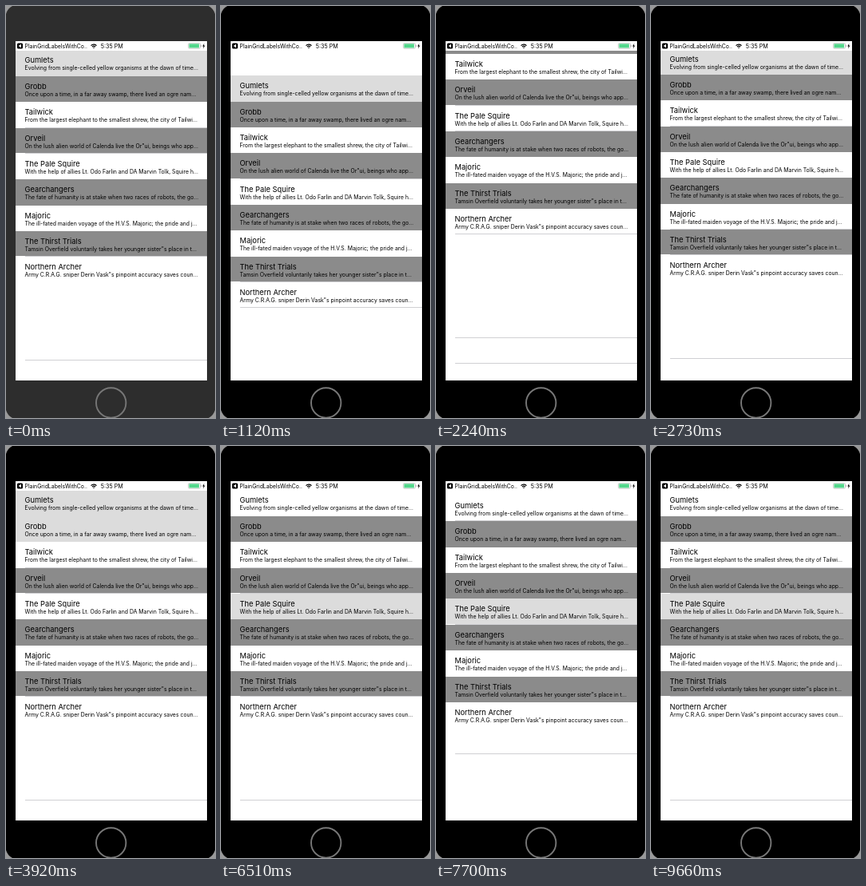
Animation of 262x516 px, one loop 9800 ms. Source, as an HTML page with a canvas:

```html
<!DOCTYPE html>
<html lang="en">
<head>
<meta charset="utf-8">
<title>Selectable list</title>
<style>
html, body { margin: 0; width: 100%; height: 100%; overflow: hidden; background: #000; }
canvas { display: block; width: 262px; height: 516px; }
</style>
</head>
<body>
<canvas id="stage" width="262" height="516"></canvas>
<script>
const ctx = document.getElementById('stage').getContext('2d');
const LOOP = 9800, STEP = 70;
const LEFT = 12, RIGHT = 252, TOP = 56, BOTTOM = 469, INDENT = 24;
const ROW_BASE = 55.49, ROW_HEIGHT = 32.34;
const FAMILY = 'Inter, "Liberation Sans", sans-serif';
const TITLE_FONT = `9.3px ${FAMILY}`, SMALL_FONT = `6.9px ${FAMILY}`;

const rows = [
  ['Gumlets', 'Evolving from single-celled yellow organisms at the dawn of time, they'],
  ['Grobb', 'Once upon a time, in a far away swamp, there lived an ogre named Grobb'],
  ['Tailwick', 'From the largest elephant to the smallest shrew, the city of Tailwick is'],
  ['Orveil', 'On the lush alien world of Calenda live the Or"ui, beings who appear'],
  ['The Pale Squire', 'With the help of allies Lt. Odo Farlin and DA Marvin Tolk, Squire has'],
  ['Gearchangers', 'The fate of humanity is at stake when two races of robots, the good'],
  ['Majoric', 'The ill-fated maiden voyage of the H.V.S. Majoric; the pride and joy of'],
  ['The Thirst Trials', 'Tamsin Overfield voluntarily takes her younger sister"s place in the'],
  ['Northern Archer', 'Army C.R.A.G. sniper Derin Vask"s pinpoint accuracy saves countless']
];

// Each pull drags the list to a peak, then it springs back.
const pulls = [
  { start: 910, peak: 1330, end: 1960, amount: 63.77 },
  { start: 1960, peak: 2240, end: 2940, amount: -60.22 },
  { start: 7000, peak: 7420, end: 8120, amount: 48.99 }
];

function scrollAt(t) {
  const p = pulls.find(p => t > p.start && t < p.end);
  if (!p) return 0;
  if (t >= p.peak) return p.amount * Math.exp((p.peak - t) / 140);
  const u = (t - p.start) / (p.peak - p.start);
  return p.amount * u * u * (3 - 2 * u);
}

function isSelected(i, t) {
  if (i === 0) return t < 3990;
  if (i === 1) return t >= 3920 && t < 5880;
  return i === 4 && t >= 5880;
}

function rect(x, y, w, h, color) {
  ctx.fillStyle = color;
  ctx.fillRect(x, y, w, h);
}

function text(str, x, y, font) {
  ctx.font = font;
  ctx.fillStyle = '#000';
  ctx.fillText(str, x, y);
}

function truncate(str, width, font) {
  ctx.font = font;
  while (ctx.measureText(str + '...').width > width) str = str.slice(0, -1);
  return str.trimEnd() + '...';
}

function polygon(points, color) {
  ctx.fillStyle = color;
  ctx.beginPath();
  points.forEach(([x, y]) => ctx.lineTo(x, y));
  ctx.fill();
}

function drawCorner(sx, sy) {
  ctx.save();
  ctx.translate(sx > 0 ? 0 : 262, sy > 0 ? 0 : 516);
  ctx.scale(sx, sy);
  ctx.fillStyle = '#999';
  ctx.beginPath();
  ctx.moveTo(0, 10);
  ctx.quadraticCurveTo(2, 3, 8, 0);
  ctx.lineTo(0, 0);
  ctx.fill();
  ctx.restore();
}

function drawPhone(t) {
  rect(0, 0, 262, 516, t < 980 ? '#2d2d2d' : '#000');
  for (const sx of [1, -1]) {
    for (const sy of [1, -1]) drawCorner(sx, sy);
  }
  ctx.strokeStyle = '#777';
  ctx.lineWidth = 1.9;
  ctx.beginPath();
  ctx.arc(131.7, 497, 18.7, 0, Math.PI * 2);
  ctx.stroke();
}

function drawStatus() {
  rect(LEFT, 44, RIGHT - LEFT, TOP - 44, '#fff');
  ctx.fillStyle = '#000';
  ctx.beginPath();
  ctx.roundRect(14, 46.5, 7, 7, 1.5);
  ctx.fill();
  polygon([[15.5, 50], [19, 47.8], [19, 52.2]], '#fff');
  text('PlainGridLabelsWithCo..', 23.5, 52.5, SMALL_FONT);
  text('5:35 PM', 118.7, 52.5, `7.2px ${FAMILY}`);

  ctx.strokeStyle = '#000';
  ctx.lineWidth = 1.2;
  for (const r of [2.8, 4.8]) {
    ctx.beginPath();
    ctx.arc(110, 53, r, -Math.PI * 0.76, -Math.PI * 0.24);
    ctx.stroke();
  }
  polygon([[110, 53.2], [108.9, 51.8], [111.1, 51.8]], '#000');

  ctx.strokeStyle = '#aaa';
  ctx.lineWidth = 0.6;
  ctx.beginPath();
  ctx.roundRect(228.6, 46.6, 15, 6.6, 1.5);
  ctx.stroke();
  rect(229.5, 47.4, 12.6, 5, '#53d78b');
  rect(244.2, 48.8, 0.8, 2.4, '#aaa');
  polygon([[248.4, 46.8], [246.3, 50.4], [247.7, 50.4], [247, 53.4], [249.5, 49.4], [248, 49.4]], '#000');
}

// Hairlines only show where they land on a pixel.
function lineShows(k, scroll) {
  const phase = scroll + 0.22 * (k - 12) + 0.01;
  return phase - Math.floor(phase) < 0.32;
}

function drawList(t) {
  const scroll = scrollAt(t);
  const rowY = k => Math.round(ROW_BASE + ROW_HEIGHT * k + scroll);
  ctx.save();
  ctx.beginPath();
  ctx.rect(LEFT, TOP, RIGHT - LEFT, BOTTOM - TOP);
  ctx.clip();
  rect(LEFT, TOP, RIGHT - LEFT, BOTTOM - TOP, '#fff');
  rows.forEach(([title, detail], i) => {
    const y = rowY(i);
    const color = isSelected(i, t) ? '#dcdcdc' : i % 2 ? '#8b8b8b' : '#fff';
    rect(LEFT, y, RIGHT - LEFT, rowY(i + 1) - y, color);
    text(title, INDENT - 0.5, y + 15.5, TITLE_FONT);
    text(detail, INDENT - 0.5, y + 25.2, SMALL_FONT);
  });
  for (let k = 1; k < 16; k++) {
    if (!lineShows(k, scroll)) continue;
    const y = rowY(k) - 1;
    rect(LEFT, y, INDENT - LEFT, 1, '#fff');
    rect(INDENT, y, RIGHT - INDENT, 1, '#d0d0d3');
  }
  ctx.restore();
}

const origin = performance.now();

function frame() {
  const elapsed = (performance.now() - origin) % LOOP;
  const t = Math.floor(elapsed / STEP) * STEP;
  drawPhone(t);
  drawList(t);
  drawStatus();
  requestAnimationFrame(frame);
}

rows.forEach(row => { row[1] = truncate(row[1], 218, SMALL_FONT); });
frame();
</script>
</body>
</html>
```
